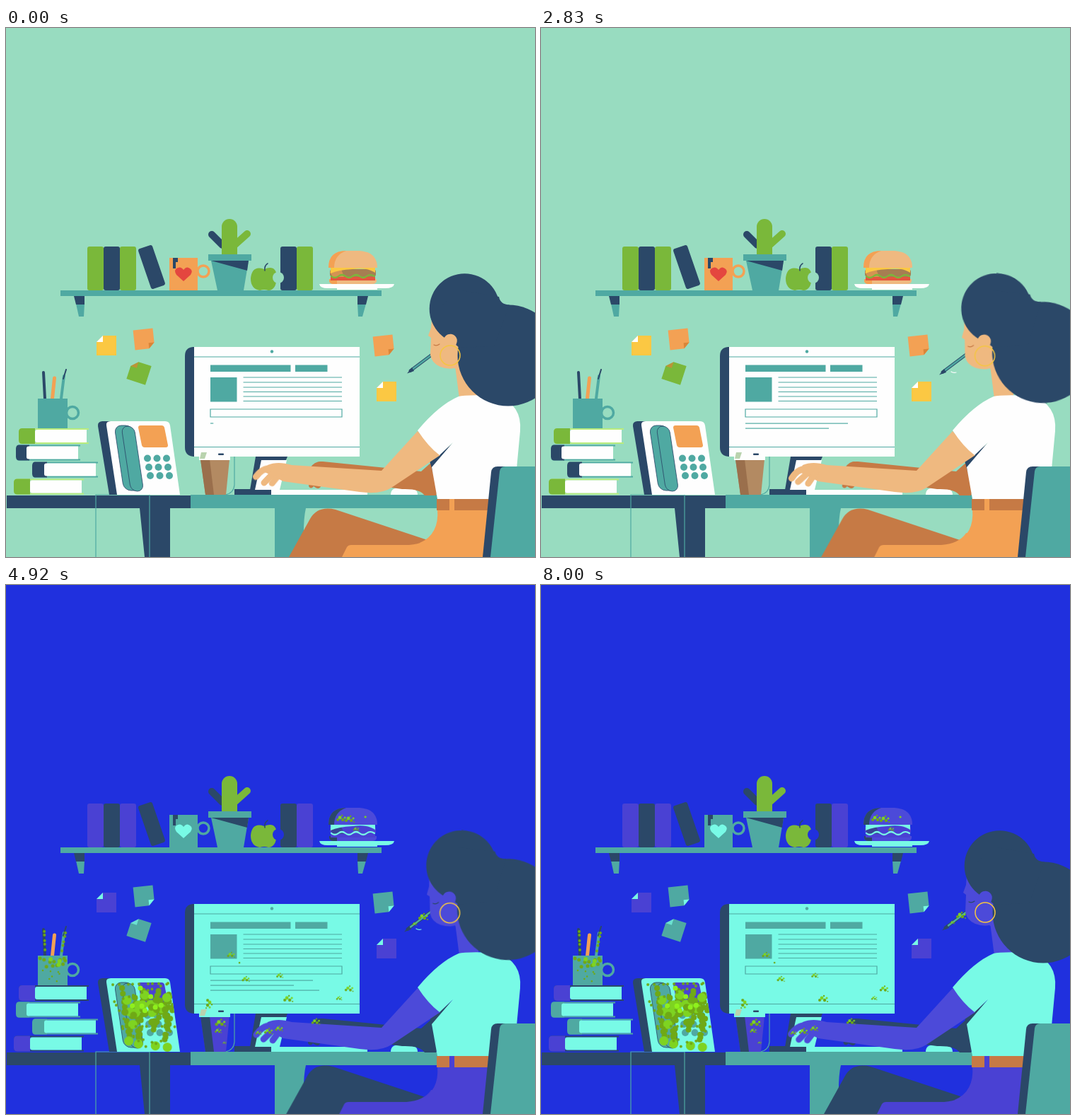
These frames come from a looping animation (748 by 748 pixels, 8.08 s). An HTML page without scripts:

```html
<!DOCTYPE html>
<html lang="en">
<head>
<meta charset="utf-8">
<title>Desk by day and night</title>
<style>
html, body { margin: 0; width: 100%; height: 100%; overflow: hidden; }
svg { display: block; width: 100%; height: 100%; background: var(--bg); animation: night 8080ms step-end infinite; }

/* palette switches hard between day and night */
@keyframes night {
  0% {
    --bg: #98dcc0; --paper: #fefefe; --leaf: #7ab83a; --pants: #f3a154; --yellow: #fbc843;
    --skin: #efb980; --shade: #c67a45; --mug: #f3a154; --memo: #7ab83a; --heart: #e4463f;
    --trim: #b9ec7c; --spine: #2b4868; --cup: #b38a62; --cup2: #9a6f4c; --crust: #f3a154;
    --patty: #a67e52; --salad: #7ab83a; --tomato: #e4563f; --cheese: #fbc843; --fold: #d98538; --germ: 0;
  }
  49.45%, 100% {
    --bg: #2030de; --paper: #78fae6; --leaf: #4a41d3; --pants: #4a41d3; --yellow: #4a41d3;
    --skin: #4c4ad9; --shade: #2b4868; --mug: #4fa9a2; --memo: #4fa9a2; --heart: #78fae6;
    --trim: #2b4868; --spine: #4fa9a2; --cup: #4a41d3; --cup2: #2b4868; --crust: #2b4868;
    --patty: #4a41d3; --salad: #78fae6; --tomato: #4a41d3; --cheese: #78fae6; --fold: #78fae6; --germ: 1;
  }
}
.bg { fill: var(--bg); } .paper { fill: var(--paper); } .leaf { fill: var(--leaf); }
.pants { fill: var(--pants); } .yellow { fill: var(--yellow); } .skin { fill: var(--skin); }
.shade { fill: var(--shade); } .mug { fill: var(--mug); } .memo { fill: var(--memo); }
.spine { fill: var(--spine); } .trim { fill: var(--trim); } .fold { fill: var(--fold); }
.navy { fill: #2b4868; } .teal { fill: #4fa9a2; } .green { fill: #7ab83a; }
.wire { fill: none; stroke: #4fa9a2; stroke-width: 1.2; }
.ring { fill: none; stroke-width: 3.5; }
.round { fill: none; stroke-linecap: round; stroke-linejoin: round; }

.type { transform-box: fill-box; transform-origin: 0 0; animation: type1 8080ms linear infinite; }
.two { animation-name: type2; }
.three { animation-name: type3; }
@keyframes type1 { 0% { transform: scaleX(.03); } 16%, 98.5% { transform: none; } 98.51%, 100% { transform: scaleX(0); } }
@keyframes type2 { 0%, 21.7% { transform: scaleX(0); } 34%, 98.5% { transform: none; } 98.51%, 100% { transform: scaleX(0); } }
@keyframes type3 { 0%, 42.8% { transform: scaleX(0); } 59.5%, 98.5% { transform: none; } 98.51%, 100% { transform: scaleX(0); } }

.head, .legs, .pen, .flick, .flick2 { animation: nod 2020ms ease-in-out infinite; }
.head { transform-origin: 640px 470px; }
.legs { animation-name: sway; }
.pen { transform-origin: 603px 461px; animation-name: pen; }
.flick { animation-name: flick; animation-timing-function: step-end; }
.flick2 { animation-name: flick2; animation-timing-function: step-end; }
@keyframes nod { 0%, 6%, 88%, 100% { transform: none; } 24%, 68% { transform: rotate(-3.5deg); } }
@keyframes sway { 0%, 6%, 88%, 100% { transform: none; } 24%, 68% { transform: translateX(-3.8px); } }
@keyframes pen {
  0%, 6%, 88%, 100% { transform: none; }
  24%, 50% { transform: translate(-4px, 2px); }
  62%, 70% { transform: translate(-1px, 1px) rotate(-11deg); }
}
@keyframes flick { 0%, 74%, 100% { opacity: 0; } 58% { opacity: 1; } }
@keyframes flick2 { 0%, 46%, 100% { opacity: 0; } 36% { opacity: 1; } }

.tap, .tap2, .far { animation: tap 505ms ease-in-out infinite; transform-origin: 382px 624px; }
.tap2 { animation-delay: -250ms; }
.far { animation: far 1010ms ease-in-out infinite; }
@keyframes tap { 0%, 100% { transform: none; } 50% { transform: rotate(5deg); } }
@keyframes far { 0%, 100% { transform: translateX(4px); } 50% { transform: translateX(-3px); } }

.germs { opacity: var(--germ); }
.dots { fill: none; stroke: #6fa916; stroke-linecap: round; }
.jig { animation: jig 1010ms ease-in-out infinite; }
.jig.b { animation-delay: -505ms; }
@keyframes jig { 0%, 100% { transform: none; } 50% { transform: translate(1.2px, -1px); } }
</style>
</head>
<body>
<svg viewBox="0 0 748 748" xmlns="http://www.w3.org/2000/svg">
<defs>
  <path id="body" d="M148 556H225Q231 556 232 562L246 660H157L142 562Q141 556 148 556Z"/>
  <clipPath id="phone"><use href="#body"/></clipPath>
  <clipPath id="pot"><path d="M45 524H87V566H45Z"/></clipPath>
  <g id="splat">
    <circle cx="-5" cy="2" r="2" fill="#6fa916"/><circle cx="-2" cy="-1" r="2.4" fill="#7ed321"/>
    <circle cx="2" cy="2" r="2.2" fill="#6fa916"/><circle cx="5" cy="-1" r="1.5" fill="#7ed321"/>
    <circle cx="1" cy="-4" r="1.2" fill="#6fa916"/><circle cx="6" cy="4" r="1" fill="#6fa916"/>
  </g>
  <g id="pages"><path class="paper" d="M3 2H73V20H3Q0 20 0 17V5Q0 2 3 2Z"/></g>
  <g id="cover"><path d="M-18 0H76V2H0V20H76V22H-18Q-23 22-23 17V5Q-23 0-18 0Z"/></g>
  <g id="keys"><circle r="5"/><circle cx="13.5" r="5"/><circle cx="27" r="5"/></g>
</defs>

<!-- shelf -->
<path class="teal" d="M77 371H531V379H77ZM99 390H111L110 408H103ZM497 390H509L504 408H498Z"/>
<path class="navy" d="M96 379H111V391H99ZM497 379H512L509 391H497Z"/>
<g class="leaf">
  <rect x="115" y="309" width="23" height="62" rx="3"/><rect x="161" y="309" width="23" height="62" rx="3"/>
  <rect x="411" y="309" width="23" height="62" rx="3"/>
</g>
<g class="navy">
  <rect x="138" y="309" width="23" height="62" rx="3"/><rect x="388" y="309" width="23" height="62" rx="3"/>
  <rect x="195.5" y="308" width="21" height="60" rx="3" transform="rotate(-19 206 338)"/>
</g>
<circle class="ring" cx="279" cy="344" r="8" style="stroke:var(--mug)"/>
<path class="mug" d="M231 325H271V371H231Z"/>
<path class="navy" d="M236 325H243V331H240V340H236Z"/>
<path d="M251 358L241 349Q237 343 241 340Q247 336 251 342Q255 336 260 340Q265 343 261 349Z" style="fill:var(--heart)"/>
<rect class="green" x="305" y="270" width="22" height="56" rx="11"/>
<path class="round" d="M322 308L341 291" stroke="#7ab83a" stroke-width="10"/>
<path class="round" d="M291 292L306 307" stroke="#2b4868" stroke-width="10"/>
<rect class="green" x="305" y="290" width="22" height="32"/>
<path class="teal" d="M286 320H347V329H343L336 371H299L290 329H286Z"/>
<path class="navy" d="M290 329H343L341 343Z"/>
<path class="green" d="M365 341Q382 334 383 352Q382 371 371 371Q365 369 359 371Q346 369 346 354Q348 335 365 341Z"/>
<circle class="bg" cx="385" cy="353" r="8"/>
<path class="round" d="M366 343Q365 336 370 333" stroke="#2b4868" stroke-width="1.5"/>

<path class="paper" d="M443 362H549Q548 368 536 368H525V370H468V368H455Q444 368 443 362Z"/>
<path d="M457 355H524V358Q523 362 518 362H463Q458 362 457 358Z" class="skin"/>
<path d="M457 355H468V362H463Q458 362 457 358Z" style="fill:var(--crust)"/>
<path d="M459 352H522V357H459Z" style="fill:var(--tomato)"/>
<rect x="458" y="341" width="65" height="11" rx="4" style="fill:var(--patty)"/>
<path d="M458 345Q460 341 474 341L478 352H462Z" style="fill:var(--crust)" opacity=".6"/>
<path class="round" d="M460 351q5 4 10 0t10 0 10 0 10 0 10 0 11 0" style="stroke:var(--salad)" stroke-width="2.2"/>
<path d="M459 338H522V346Q510 338 490 341Q470 342 459 347Z" style="fill:var(--cheese)"/>
<path d="M456 339Q456 315 481 315H500Q525 317 525 339Z" class="skin"/>
<path d="M456 339Q456 315 481 315Q464 321 464 339Z" style="fill:var(--crust)"/>

<!-- notes -->
<g id="sticky">
  <path class="yellow" d="M137 435H156V463H128V444Z"/><path class="paper" d="M137 435V444H128Z"/>
</g>
<use href="#sticky" x="396" y="65"/>
<g id="memo" transform="rotate(-6 195 440)">
  <path class="mug" d="M181 426H209V446L201 454H181Z"/><path class="fold" d="M201 454V446H209Z"/>
</g>
<use href="#memo" x="339" y="9"/>
<g transform="rotate(18 188 487)">
  <path class="memo" d="M183 473H202V501H174V482Z"/><path class="trim" d="M183 473V482H174Z" style="fill:var(--fold)" opacity=".7"/>
</g>

<!-- screen -->
<path class="navy" d="M268 451H264Q253 452 253 464V593Q253 605 265 606H268Z"/>
<path class="paper" d="M266 451H500V606H266Z"/>
<circle class="teal" cx="376" cy="457.5" r="2.2"/>
<path class="teal" d="M289 476.500H402.500V486H289ZM409 476.500H454.500V486H409ZM289 494H326.500V528.500H289Z"/>
<path class="wire" d="M266 465H500M266 592.500H500M335.500 494H475M335.500 501H475M335.500 508H475M335.500 514.500H475M335.500 521H475M335.500 527.500H475M289 539H475V550H289Z"/>
<rect class="teal type" x="289" y="558.500" width="145" height="1.2"/>
<rect class="teal type two" x="289" y="565.500" width="118" height="1.2"/>
<rect class="teal type three" x="289" y="572.500" width="154" height="1.2"/>

<!-- desk -->
<path class="navy" d="M1 661H262V679H232V748H196L189 679H1Z"/>
<path class="teal" d="M261 660H612V679H424Q419 700 422 748H380V679H261Z"/>
<path class="wire" d="M127 748V660H203V748M323 606V646Q322 658 310 660"/>
<path class="navy" d="M353 606H398L395 613H370L354 653H345ZM323 652H376V660H323Z"/>
<path class="paper" d="M361 611H397L387 653H352ZM375 653H511V660H375ZM544 660Q544 650 556 650H570Q582 651 582 660Z"/>

<!-- cup -->
<path d="M275 610H316L311 660H282Z" style="fill:var(--cup)"/>
<path d="M275 610H288L294 660H282Z" style="fill:var(--cup2)"/>
<path class="paper" d="M279 600H313L317 605V611H273V605Z"/>
<path d="M276 600H284L281 609H274Z" fill="#b9d3ae"/>
<rect class="navy" x="300" y="601.500" width="8" height="2.5" rx="1"/>

<!-- book stack -->
<g transform="translate(41 566)"><use href="#cover" class="trim"/><path class="leaf" d="M-18 0H0V22H-18Q-23 22-23 17V5Q-23 0-18 0Z"/><use href="#pages"/></g>
<g transform="translate(29 589.500)"><use href="#cover" class="teal"/><path class="spine" d="M-10 0H4V22H-10Q-15 22-15 17V5Q-15 0-10 0Z"/><path class="bg" d="M-24-1H-10Q-15 0-15 5V17Q-15 22-10 23H-24Z"/><use href="#pages"/></g>
<g transform="translate(54 613.500)"><use href="#cover" class="teal"/><path class="spine" d="M-13 0H4V22H-13Q-17 22-17 17V5Q-17 0-13 0Z"/><path class="bg" d="M-24-1H-12Q-17 0-17 5V17Q-17 22-12 23H-24Z"/><use href="#pages"/></g>
<g transform="translate(34 637.500)"><use href="#cover" class="trim"/><path class="leaf" d="M-18 0H0V22H-18Q-23 22-23 17V5Q-23 0-18 0Z"/><use href="#pages"/></g>

<!-- pens -->
<g class="round" stroke-width="4">
  <path d="M53 487L55 524" stroke="#2b4868"/><path d="M68.500 495L65.500 524" stroke="#f3a154" stroke-width="5"/>
  <path d="M82 492L78 524" stroke="#4fa9a2"/><path d="M85 483L81 496" stroke="#2b4868" stroke-width="2"/>
</g>
<circle class="ring" cx="94" cy="544" r="8.500" stroke="#4fa9a2"/>
<path class="teal" d="M45 524H87V566H45Z"/>

<!-- phone -->
<path class="navy" d="M136 556H150L160 660H146L130 563Q129 557 136 556Z"/>
<use href="#body" class="paper"/>
<g class="teal" stroke="#2b4868" stroke-width=".8">
  <rect width="26" height="92" rx="10" transform="translate(153 562) skewX(8.500)"/>
  <rect width="18" height="92" rx="9" transform="translate(163 563) skewX(8.500)"/>
</g>
<path class="pants" d="M190 562H220Q223 562 224 565L229 590Q229 593 226 593H196Q193 593 192 590L187 565Q187 562 190 562Z"/>
<g class="teal"><use href="#keys" x="200" y="608.500"/><use href="#keys" x="202" y="621"/><use href="#keys" x="204" y="633"/></g>

<!-- legs -->
<g class="legs">
  <path class="shade" d="M400 748L430 694Q441 675 466 681L605 727V748Z"/>
  <path class="pants" d="M475 748L482 734Q484 731 488 731H570Q595 729 605 714H630V748Z"/>
</g>
<path class="pants" d="M610 680H690V748H585V728Q613 716 610 680Z"/>

<!-- far arm -->
<path class="shade" d="M430 622Q436 612 448 613L587 627L632 587L608 661H592Q585 651 560 652L430 634Z"/>
<g class="far"><path class="shade" d="M442 613Q434 613 429 621L416 640Q420 645 425 641L424 648Q427 653 431 648L434 650Q439 653 442 647L450 630Z"/></g>

<!-- torso -->
<path class="navy" d="M634 585L613 603L599 612L604 630Z"/>
<path class="skin" d="M582 570L531 626L404 618Q384 612 370 618L366 628L392 641L500 656Q530 660 545 650L614 604Z"/>
<g class="round" style="stroke:var(--skin)" stroke-width="9">
  <path d="M390 626L378 644" class="tap2"/><path d="M383 624L365 643" class="tap"/><path d="M375 623Q362 624 354.500 637" class="tap2"/>
</g>
<path class="skin" d="M634 470L641 524Q655 530 668 522V470Z"/>
<path class="paper" d="M582 569Q612 533 640 521Q650 518 695 520Q730 533 727 570L718 666H610L602 621L632 586L613 604Q597 592 582 569Z"/>
<path d="M609 666H690V682H609Z" fill="#c67a45"/>
<path class="pants" d="M627 666H634V682H627Z"/>

<!-- pencil -->
<g class="round" style="stroke:var(--paper)" stroke-width="1.2">
  <path class="flick" d="M577 475Q584 470 582 480Q591 479 595 490"/><path class="flick2" d="M580 486Q583 488 587 487"/>
</g>
<g class="pen">
  <path class="round" d="M606 459L572 484.500" stroke="#2b4868" stroke-width="4.600"/>
  <path class="round" d="M606 459L574 483" stroke="#4fa9a2" stroke-width="2.600"/>
  <path class="navy" d="M574 480L567 488.500L577 485Z"/>
  <g class="germs"><use href="#splat" x="594" y="467"/><use href="#splat" transform="translate(582 477) scale(.5)"/></g>
</g>

<!-- head -->
<g class="head">
  <path class="skin" d="M602 410L601 424L597 435L601 438L600 462Q602 474 614 479Q624 483 634 481L660 500V440L620 410Z"/>
  <path class="round" d="M605 448Q609 450 613 447" style="stroke:var(--shade)" stroke-width="1.2"/>
  <g class="navy">
    <circle cx="648.500" cy="397" r="49.800"/><circle cx="710" cy="463" r="71.500"/>
    <path d="M600 407Q606 430 624 438L641 452L690 450L712 391.500Q699 391 697 380L640 370Z"/>
  </g>
  <path class="skin" d="M619 444A9.500 9.500 0 1 1 637 446Q635 455 625 456Z"/>
  <circle cx="628" cy="463" r="14" fill="none" stroke="#f4c542" stroke-width="1.500"/>
</g>

<!-- chair -->
<path class="navy" d="M674 748L686 628Q687 620 695 620H710V748Z"/>
<path class="teal" d="M685 748L698 627Q699 620 706 620H748V748Z"/>

<!-- germs -->
<g class="germs">
  <g clip-path="url(#phone)">
    <path class="dots jig" stroke-width="8" stroke-dasharray="0 8 0 12 0 7" d="M164 570L174 640L182 580L188 650L194 570L206 605L216 572L208 630L232 575L224 645L238 590"/>
    <path class="dots jig b" stroke-width="13" stroke-dasharray="0 17 0 24" style="stroke:#7ed321" d="M170 588L176 610L198 576L206 600L228 580L214 612L186 590L172 648L232 655"/>
    <path class="dots jig" stroke-width="10" stroke-dasharray="0 13 0 19" d="M168 604L190 612L218 586L204 624L230 606L206 580"/>
    <path class="dots jig b" stroke-width="4" stroke-dasharray="0 9 0 13 0 6" d="M150 566L230 564L152 590L180 640L214 650L238 625L160 625L200 656"/>
    <path class="dots" stroke-width="7" stroke-dasharray="0 19" style="stroke:#8ff01c" d="M190 570L224 598L176 594L208 606"/>
  </g>
  <path class="dots jig" stroke-width="4" stroke-dasharray="0 5 0 8" d="M54 490L55 516M84 492L78 522"/>
  <g clip-path="url(#pot)">
    <path class="dots jig" stroke-width="5" stroke-dasharray="0 6 0 9" d="M48 528L64 534L86 527L80 537L56 540"/>
    <path class="dots jig b" stroke-width="6" stroke-dasharray="0 13" style="stroke:#7ed321" d="M62 530L80 534L66 542"/>
    <path class="dots" stroke-width="2.500" stroke-dasharray="0 11" d="M52 545L80 548L58 556L78 562"/>
  </g>
  <g class="jig">
    <use href="#splat" x="474" y="330"/><use href="#splat" x="486" y="331"/><use href="#splat" transform="translate(495 345) scale(.6)"/>
    <circle cx="508" cy="328" r="1.600" fill="#7ed321"/>
    <use href="#splat" transform="translate(318 523) scale(.8)"/><use href="#splat" x="399" y="585"/><use href="#splat" transform="translate(485 571) scale(.9)"/>
    <use href="#splat" transform="translate(303 619) scale(1.100)"/><use href="#splat" transform="translate(371 631) scale(.9)"/><use href="#splat" transform="translate(357 633) scale(.6)"/>
  </g>
  <g class="jig b">
    <use href="#splat" transform="translate(338 558) scale(.8)"/><use href="#splat" transform="translate(386 553) scale(.7)"/><use href="#splat" transform="translate(470 585) scale(.6)"/>
    <use href="#splat" transform="translate(286 593) rotate(90)"/><use href="#splat" transform="translate(299 631) scale(.7)"/><use href="#splat" transform="translate(308 648) scale(.4)"/>
    <use href="#splat" transform="translate(385 628) scale(.8)"/><use href="#splat" transform="translate(437 618) scale(.9)"/>
    <circle cx="329" cy="535" r="1.300" fill="#6fa916"/>
  </g>
</g>
</svg>
</body>
</html>
```
